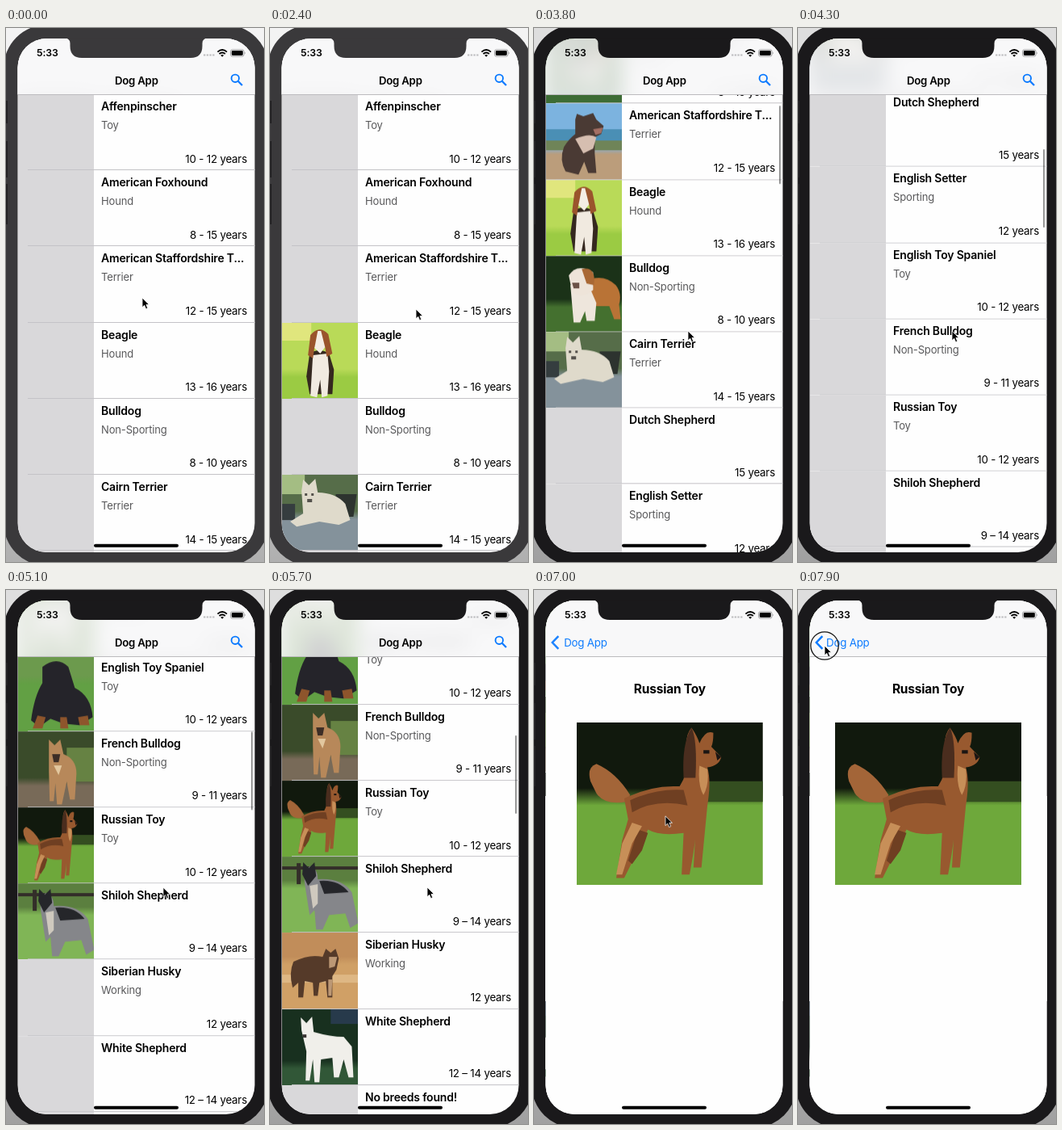
Animation of 320 by 661 pixels, one loop 8000 ms. Source, as an HTML page:

```html
<!DOCTYPE html>
<html lang="en">
<head>
<meta charset="utf-8">
<title>Dog App</title>
<style>
@property --y { syntax: "<number>"; inherits: true; initial-value: 0; }
html, body { margin: 0; width: 100%; height: 100%; overflow: hidden; }
#stage {
  position: relative; width: 320px; height: 661px; overflow: hidden;
  background: linear-gradient(transparent 30%, rgba(0,0,0,.28)) #f3f3f3;
  font: 13.3px/20px Inter, "Liberation Sans", sans-serif; letter-spacing: -.2px;
  color: #000; white-space: nowrap;
}
#stage, #stage * { animation-duration: 8s; animation-iteration-count: infinite; }
#stage { animation-name: backdrop; }
#stage * { position: absolute; box-sizing: border-box; }
svg * { position: static !important; }
.phone { left: -3px; top: -4px; width: 329px; height: 670px; border-radius: 54px; background: #3a393b; animation-name: focus; }
.key { left: 0; width: 1.5px; background: #222123; }
.screen { inset: 0; clip-path: inset(13px 11.5px 12px 14.5px round 36px); background: #fefefe; animation-name: scroll; }
.home { inset: 0; animation-name: leave; }
.list { inset: 0; transform: translateY(calc(var(--y) * -1px)); }
.glass { left: 0; top: 0; width: 320px; height: 82px; overflow: hidden; background: #fefefe; }
.glass .list { filter: blur(12px); }
.row { left: 14.5px; width: 294px; height: 94.2px; }
.row::after { content: ""; position: absolute; left: 12px; right: 0; bottom: 0; height: 1px; background: #c4c3c7; }
.thumb { left: 0; top: 0; width: 94.5px; height: 94.2px; background: #d9d8da; }
.thumb svg { width: 100%; height: 100%; }
.name { left: 103.5px; top: 5px; font-size: 14px; font-weight: 600; }
.group { left: 103.5px; top: 28px; font-size: 13px; letter-spacing: -.15px; color: #58585a; }
.age { right: 9.5px; top: 69.5px; }
.bar { left: 304px; top: 72px; width: 2.4px; height: 97px; border-radius: 2px; background: rgba(0,0,0,.4);
  transform: translateY(calc(var(--y) * .137px)); animation-name: bar; }
.page { inset: 0; background: #fefefe; animation-name: enter; }
.page h1 { left: 0; width: 323px; top: 113px; margin: 0; text-align: center; font-size: 15.5px; font-weight: 700; line-height: 20px; }
.page svg { left: 46px; top: 163.5px; width: 231px; height: 201px; }
.nav { left: 0; top: 0; width: 320px; height: 82.5px; border-bottom: 1px solid #bcbbbe; background: rgba(247,247,248,.82); }
.title { left: 135px; top: 55px; font-weight: 600; font-size: 13.2px; letter-spacing: -.22px; animation-name: title; }
.back { left: 35px; top: 55px; color: #0a7aff; animation-name: back; }
.over { left: 0; top: 0; width: 320px; height: 661px; }
.find { animation-name: gone; }
.chev { animation-name: come; }
.time { left: 38px; top: 21px; font-size: 12.3px; font-weight: 600; letter-spacing: -.05px; }
.cursor { left: 0; top: 0; animation-name: move; animation-timing-function: ease-in-out; }
.cursor svg { left: -20px; top: -20px; width: 40px; height: 40px; }
.ring { animation-name: ring; }

@keyframes backdrop { 0%, 43.7% { background-color: #f3f3f3; } 43.71%, 100% { background-color: #dedede; } }
@keyframes focus { 0%, 43.7% { background: #3a393b; } 43.71%, 100% { background: #1a191b; } }
/* drag, then momentum with a 500 ms time constant */
@keyframes scroll {
  0%, 43.75% { --y: 0; animation-timing-function: cubic-bezier(.4,.1,.7,.35); }
  47.25% { --y: 150; animation-timing-function: cubic-bezier(.333,.527,.667,.806); }
  53.5% { --y: 559.6; animation-timing-function: cubic-bezier(.333,.527,.667,.806); }
  59.75% { --y: 712; animation-timing-function: cubic-bezier(.333,.527,.667,.806); }
  66% { --y: 769; animation-timing-function: cubic-bezier(.333,.527,.667,.806); }
  72.25% { --y: 790; animation-timing-function: ease-out; }
  78.5%, 100% { --y: 798; }
}
@keyframes bar { 0%, 43.8% { opacity: 0; } 44.5%, 76% { opacity: 1; } 79.5%, 100% { opacity: 0; } }
@keyframes leave {
  0%, 83.5% { transform: none; animation-timing-function: cubic-bezier(.2,.8,.2,1); }
  89.75%, 100% { transform: translateX(-88px); }
}
@keyframes enter {
  0%, 83.5% { transform: translateX(320px); animation-timing-function: cubic-bezier(.2,.8,.2,1); }
  89.75%, 100% { transform: none; }
}
@keyframes title {
  0%, 83.5% { transform: none; opacity: 1; animation-timing-function: cubic-bezier(.2,.8,.2,1); }
  89.75%, 100% { transform: translateX(-100px); opacity: 0; }
}
@keyframes back {
  0%, 83.5% { transform: translateX(100px); opacity: 0; animation-timing-function: cubic-bezier(.2,.8,.2,1); }
  89.75%, 100% { transform: none; opacity: 1; }
}
@keyframes gone { 0%, 83.5% { opacity: 1; } 87%, 100% { opacity: 0; } }
@keyframes come { 0%, 84.5% { opacity: 0; } 89%, 100% { opacity: 1; } }
@keyframes move {
  0%, 1.5% { transform: translate(169px, 334px); }
  5% { transform: translate(188px, 297px); }
  9% { transform: translate(170px, 382px); }
  12.5%, 18% { transform: translate(174px, 353px); }
  20%, 24.5% { transform: translate(178px, 354px); }
  26.25%, 30% { transform: translate(181px, 348px); }
  34.5%, 36% { transform: translate(283px, 67px); }
  41%, 43.5% { transform: translate(173px, 523px); }
  47.25%, 54% { transform: translate(191px, 375px); }
  65%, 72% { transform: translate(195px, 368px); }
  79.5%, 86% { transform: translate(168px, 288px); }
  97%, 100% { transform: translate(33px, 69px); }
}
@keyframes ring {
  0%, 41.5% { opacity: 0; } 41.51%, 47.2% { opacity: 1; }
  47.21%, 80.4% { opacity: 0; } 80.41%, 82.8% { opacity: 1; }
  82.81%, 98.1% { opacity: 0; } 98.11%, 100% { opacity: 1; }
}
</style>
</head>
<body>
<div id="stage">
  <div class="phone"></div>
  <div class="key" style="top:90px;height:28px"></div>
  <div class="key" style="top:140px;height:45px"></div>
  <div class="key" style="top:193px;height:50px"></div>
  <div class="screen">
    <div class="home">
      <div class="list"></div>
      <div class="bar"></div>
      <div class="glass"></div>
    </div>
    <div class="page"><h1>Russian Toy</h1></div>
    <div class="nav"></div>
    <div class="title">Dog App</div>
    <div class="back">Dog App</div>
    <div class="time">5:33</div>
    <svg class="over" viewBox="0 0 320 661">
      <g class="find" fill="none" stroke="#0a7aff" stroke-width="1.9"><circle cx="284.3" cy="62.3" r="4.7"/><path d="M287.8 65.8L293 71" stroke-width="2.3"/></g>
      <path class="chev" d="M30.3 57.2L22.8 65L30.3 72.8" fill="none" stroke="#0a7aff" stroke-width="2.5"/>
      <path d="M245 33.5h2.4M248.7 33.5h2.4M252.4 33.5h2.4M256.1 33.5h2.4" stroke="#bdbdc0" stroke-width="2.2"/>
      <path d="M262.4 29.6q5.8-5 11.6 0M264.5 32.1q3.7-3 7.4 0" fill="none" stroke="#000" stroke-width="1.9"/>
      <path d="M266.2 33.7q2-1.5 4 0l-2 2.1z"/>
      <rect x="278.5" y="26.8" width="16.6" height="8.4" rx="2.3" fill="none" stroke="#8d8d8f" stroke-width=".8"/>
      <rect x="279.8" y="28.1" width="14" height="5.8" rx="1.3"/>
      <path d="M296 29.5q1.6 1.5 0 3z" fill="#8d8d8f"/>
      <rect x="109" y="638.8" width="105" height="4" rx="2"/>
    </svg>
  </div>
  <svg class="over" viewBox="0 0 320 661"><path id="notch" d="M73 12.5Q79.5 13 79.5 19V22Q79.5 37 94 37H229Q243.5 37 243.5 22V19Q243.5 13 250 12.5Z"/></svg>
  <div class="cursor"><svg viewBox="-20 -20 40 40">
    <circle class="ring" r="17.2" fill="none" stroke="#111" stroke-width="1.3"/>
    <path d="M0 0V11.8L2.7 9.3L4.6 13.7L6.7 12.8L4.9 8.5H8.5Z" stroke="#fff" stroke-width=".8"/>
  </svg></div>
</div>
<script>
// name, group, years, load time in ms
const breeds = [
  ["Affenpinscher", "Toy", "10 - 12", 2890],
  ["American Foxhound", "Hound", "8 - 15", 2590],
  ["American Staffordshire T...", "Terrier", "12 - 15", 2690],
  ["Beagle", "Hound", "13 - 16", 2380],
  ["Bulldog", "Non-Sporting", "8 - 10", 2790],
  ["Cairn Terrier", "Terrier", "14 - 15", 2380],
  ["Dutch Shepherd", "", "15", 4790],
  ["English Setter", "Sporting", "12", 4690],
  ["English Toy Spaniel", "Toy", "10 - 12", 4990],
  ["French Bulldog", "Non-Sporting", "9 - 11", 4890],
  ["Russian Toy", "Toy", "10 - 12", 4790],
  ["Shiloh Shepherd", "", "9 – 14", 5090],
  ["Siberian Husky", "Working", "12", 5190],
  ["White Shepherd", "", "12 – 14", 5290],
  ["No breeds found!", "", "", 0]
];

const stand = "M16 38Q34 32 54 36L60 24 62 12 67 19 70 11 73 22 83 28 80 34 72 37Q72 52 68 60L67 88H61L59 66 54 86H49L49 62 32 62 29 72 30 88H24L21 72 17 86H12L17 62Q14 50 16 38Z";

// sky, ground, horizon, then "fill, path" pairs
const photos = [
  ["#d3dfbd", "#a3bd62", 56, "#3b3c45", "M13 22Q16 9 27 11Q38 12 41 23Q54 20 64 25Q72 22 69 16Q62 16 63 11Q72 6 76 18Q78 24 75 30Q80 46 78 60L80 82 72 84 66 66Q54 74 46 68L40 90H30L28 72 24 88 18 86 19 56Q10 40 13 22Z", "#24252c", "M16 30Q26 22 36 30L34 50Q24 54 18 44ZM44 46Q60 60 76 44L74 62Q58 70 44 64Z"],
  ["#294522", "#3d6c35", 26, "#efe6da", "M26 40Q20 24 24 11L27 12Q25 26 32 38L54 37 64 24 78 28 80 36 69 42 66 56 68 80H63L60 58 57 80H52L52 57 38 55 34 64 30 80H25L28 60Z", "#a8683b", "M58 37L62 24Q72 18 78 28L70 32 68 44 62 40Z", "#29221e", "M30 38L56 37 54 48 34 48Z"],
  ["#7cb3df", "#bb9d7b", 58, "#4a8fb5", "M0 32H94V46H0Z", "#6f8458", "M0 46H94V58H0Z", "#4a3a34", "M36 20L38 13 46 16 58 12 62 20 71 28 68 38 60 42 60 62 62 86H52L47 72 40 88 24 84Q16 70 22 54Q28 44 36 38Z", "#d6beb0", "M36 44Q54 36 62 42L58 56 46 62Z", "#a46f64", "M58 32L70 30 68 37 61 39Z"],
  ["#b9da58", "#9bcb43", 62, "#e0e67d", "M0 0H36V22H0Z", "#35281f", "M34 38Q46 30 58 38L64 58 62 88 34 88 30 66Z", "#f1eae0", "M38 40L56 38 58 60 56 90 49 92 47 70 43 92 35 90Z", "#9a542c", "M32 40L35 15Q46 2 57 14L62 38 55 42 53 30H40L38 44Z", "#f4ede4", "M44 10H48L53 30 47 38 40 31Z"],
  ["#1b3218", "#44702f", 58, "#b97336", "M46 32Q70 20 86 36Q94 46 90 60L92 78H84L78 62H54Z", "#eee6dc", "M30 36L56 44 62 58 60 80H50L48 68 42 82H34Z", "#eee4d9", "M28 24Q38 8 58 20L58 42Q44 54 32 44Z", "#a96834", "M44 16Q62 12 59 36L50 34Z", "#6b5247", "M32 33H41V40H34Z"],
  ["#566d49", "#84929b", 50, "#2d332f", "M66 24H92L88 52H70Z", "#a4bd83", "M0 0H28V24H0Z", "#353d3f", "M0 36H16V56H0Z", "#dfdacb", "M24 20L26 6 33 13 41 5 44 22Q66 22 78 36L84 56 70 62 46 58 18 64 10 58 26 48Z", "#55524d", "M28 23H31V26H28ZM36 23H39V26H36ZM31 30H37V34H31Z"],
  ["#7fa060", "#6f9a48", 45, "#67513d", stand],
  ["#87a56b", "#689248", 40, "#e6e2d8", stand, "#50504f", "M60 24L72 14 78 27 69 36Z"],
  ["#6c9a4d", "#62a044", 30, "#25242a", "M30 14Q48 0 62 14L70 40Q90 50 92 76L76 86 56 84 40 78 26 88 16 80Q20 50 30 34Z", "#8e552c", "M24 74L34 76 30 90H18ZM52 76H60L62 90H52ZM74 76L86 74 88 86H76Z"],
  ["#3a4b2a", "#786a58", 62, "#668243", "M60 20H94V62H60Z", "#b7885a", "M38 26L38 10 45 17 52 10 56 28Q72 34 72 52L70 84H64L60 62 54 90H48L46 64 44 86H39L38 50Z", "#3c2d26", "M42 28H52L50 38H44Z", "#e2c79f", "M44 42L54 42 50 54Z"],
  ["#11190d", "#6ea83b", 43, "#344e20", "M58 34H94V46H58Z", "#a36538", "M25 46Q14 48 10 41L7 34Q5 26 10 24Q20 29 27 42Z", "#98592f", "M24 44Q38 36 52 37Q56 30 56 20Q54 8 58 3Q61 8 62 12Q65 4 69 6Q69 12 68 14L73 20Q72 25 66 26Q68 34 66 48L63 84H59L60 64Q60 70 57 88H53L54 64Q42 66 36 62L33 70 31 74 24 90H20L23 68 26 56Z", "#4a2d1e", "M54 32Q53 12 58 3Q61 10 60 32Z", "#6f3f22", "M27 45Q40 38 54 39L56 48Q40 44 28 52ZM31 62L36 64 33 74 28 82 26 80Z", "#c78f58", "M28 58L33 60 28 70 23 88H20L23 70ZM62 25L66 27Q67 36 64 42Q61 36 62 25Z", "#1b1513", "M70 17L73 20 71 22ZM64 16H67V18H64Z"],
  ["#5b7f3f", "#80b556", 34, "#332e29", "M0 12H94V16H0ZM18 8H23V34H18Z", "#85868a", "M28 34Q26 18 34 12Q44 14 44 28Q74 26 86 44L94 82 84 88 78 70 58 72 50 90H42L40 66 34 72Z", "#25262a", "M25 22L26 7 33 14 40 7 42 24 32 36ZM46 30Q70 28 82 44L52 46Z", "#cfc9be", "M34 36L44 34 44 58 38 64Z"],
  ["#c18d5a", "#d0a066", 34, "#deb784", "M0 52H94V62H0Z", "#553a29", "M14 36Q34 26 50 30L54 20 60 25 66 20 70 32 67 46 62 54 62 80H56L54 60 46 62 44 78H39L38 62 28 60 26 80H20L20 62 13 68Q8 50 14 36Z", "#bc9875", "M58 30L68 30 65 42 58 44ZM57 58H62L61 78H57Z"],
  ["#18301f", "#315737", 68, "#273a4b", "M60 0H94V18H60Z", "#f0efea", "M24 26L23 10 30 17 37 9 39 28Q60 34 76 34L86 46 88 84H82L76 62 70 84H64L62 60 48 62 46 90H40L38 62 34 88H29L30 52Z", "#3a3534", "M25 31H30V35H26Z"]
];

// each photo fades softly from its sky into its ground
function photo([sky, ground, horizon, ...parts], id) {
  let shapes = "";
  for (let i = 0; i < parts.length; i += 2) shapes += `<path fill="${parts[i]}" d="${parts[i + 1]}"/>`;
  return `<svg viewBox="0 0 94 94" preserveAspectRatio="none"><linearGradient id="bg${id}" x2="0" y2="1">` +
    `<stop offset="${(horizon - 5) / 94}" stop-color="${sky}"/><stop offset="${(horizon + 5) / 94}" stop-color="${ground}"/>` +
    `</linearGradient><rect width="94" height="94" fill="url(#bg${id})"/>${shapes}</svg>`;
}

const $ = s => document.querySelector(s);
const loop = { duration: 8000, iterations: Infinity };

$(".list").innerHTML = breeds.map(([name, group, age], i) =>
  `<div class="row" style="top:${82 + 94.2 * i}px"><div class="thumb">${photos[i] ? photo(photos[i], i) : ""}</div>` +
  `<span class="name">${name}</span><span class="group">${group}</span>` +
  `<span class="age">${age && age + " years"}</span></div>`).join("");
$(".glass").append($(".list").cloneNode(true));
$(".page").insertAdjacentHTML("beforeend", photo(photos[10], "Page"));

function switchAt(el, prop, from, to, ms) {
  const offset = ms / 8000;
  el.animate([{ [prop]: from }, { [prop]: from, offset }, { [prop]: to, offset }, { [prop]: to }], loop);
}
document.querySelectorAll(".thumb svg").forEach((el, i) => switchAt(el, "opacity", 0, 1, breeds[i % photos.length][3]));
switchAt($("#notch"), "fill", "#3a393b", "#1a191b", 3496);

// keep every animation on one clock
const start = document.timeline.currentTime;
document.getAnimations().forEach(a => a.startTime = start);
</script>
</body>
</html>
```
